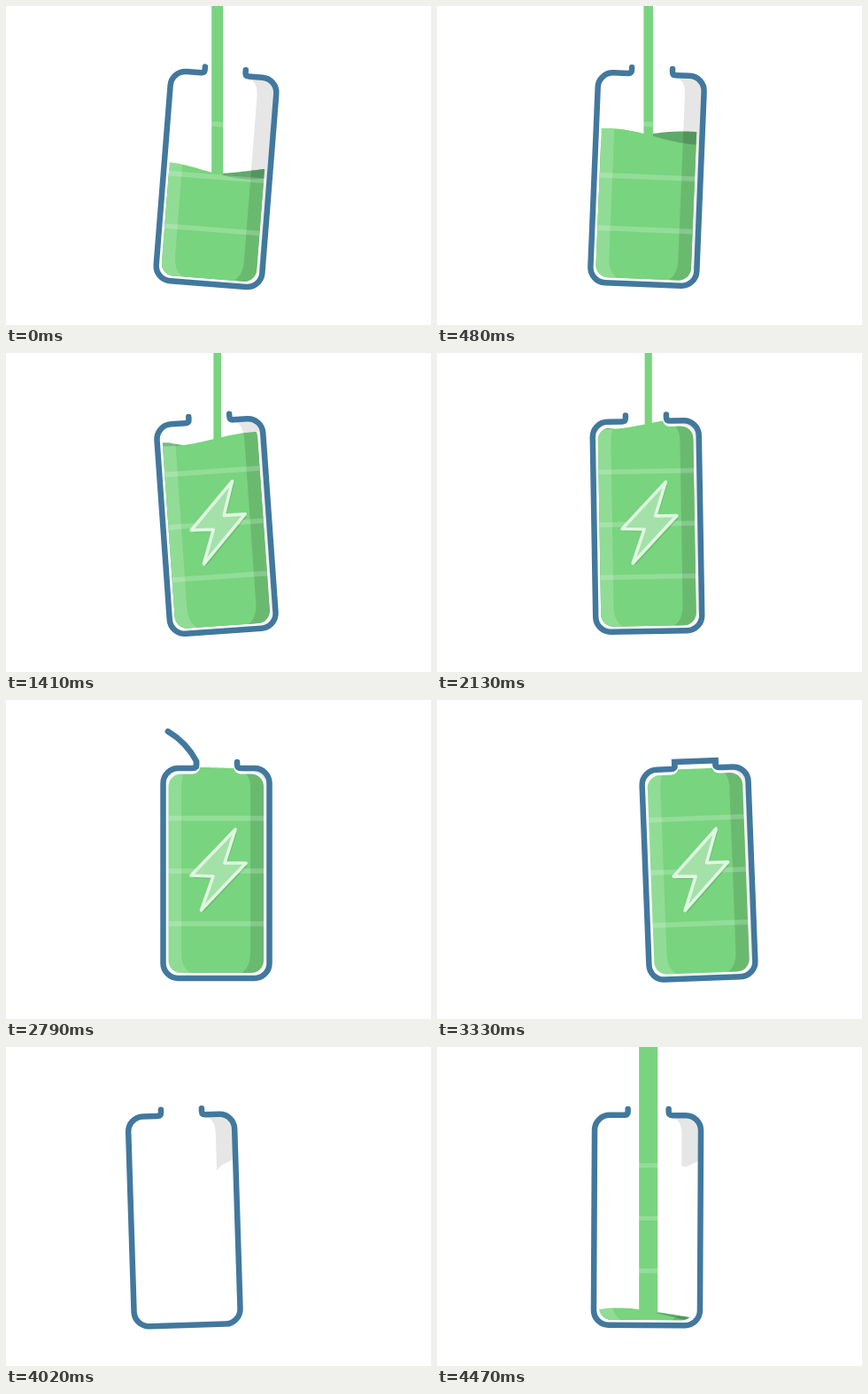
An HTML page that plays this animation: 480 px wide and 360 px high, repeating every 4500 ms.

```html
<!DOCTYPE html>
<html lang="en">
<head>
<meta charset="utf-8">
<title>Filling battery</title>
<style>
  html, body { margin: 0; width: 100%; height: 100%; overflow: hidden; background: #fff; }
  svg { display: block; width: 100vw; height: 100vh; }
</style>
</head>
<body>
<svg id="stage" viewBox="0 0 480 360"></svg>
<script>
const LOOP = 4500, STEP = 30, SEAL = 2790, GAP = 510;
const CX = 237.5, CY = 195.5, HALF = 54, POUR_X = 238.7;
const GREEN = '#78d47e', BLUE = '#42789e', DARK = '#5fa96b', GRAY = '#e6e6e6';

const OUTLINE = 'M215 70V73Q215 77 211 77H194.5A17 17 0 0 0 177.5 94V297A17 17 0 0 0 194.5 314' +
  'H280.5A17 17 0 0 0 297.5 297V94A17 17 0 0 0 280.5 77H265Q261 77 261 73V70';
const INNER = 'M183.5 97A14 14 0 0 1 197.5 83.5H211Q218 83 219 76V72H257V76Q258 83 265 83.5H277' +
  'A14 14 0 0 1 291 97V294A14 14 0 0 1 277 308H197.5A14 14 0 0 1 183.5 294Z';
const LIGHT_SIDE = 'M204 70Q198 88 198 100V285Q198 305 212 310H180V70Z';
const DARK_SIDE = 'M266 80Q276 84 276 100V285Q276 304 263 310H295V80Z';
const BOLT = 'M220.5 237L234 199L209 198L259 146L247 184L271 184Z';

const ramp = (t, a, b) => Math.max(0, Math.min(1, (t - a) / (b - a)));
const smooth = (t, a, b) => { const u = ramp(t, a, b); return u * u * (3 - 2 * u); };
const wave = (t, period) => Math.cos(2 * Math.PI * t / period);

// Smooth monotone curve through [time, value] points.
function track(...pts) {
  const last = pts.length - 1;
  const rise = i => (pts[i + 1][1] - pts[i][1]) / (pts[i + 1][0] - pts[i][0]);
  const tangent = pts.map((_, i) => {
    if (i === 0 || i === last) return 0;
    const a = rise(i - 1), b = rise(i);
    return a * b <= 0 ? 0 : 2 * a * b / (a + b);
  });
  return t => {
    if (t <= pts[0][0]) return pts[0][1];
    if (t >= pts[last][0]) return pts[last][1];
    let i = 0;
    while (t >= pts[i + 1][0]) i++;
    const h = pts[i + 1][0] - pts[i][0], u = (t - pts[i][0]) / h, w = 1 - u;
    return pts[i][1] * (1 + 2 * u) * w * w + pts[i + 1][1] * u * u * (3 - 2 * u) +
      h * u * w * (tangent[i] * w - tangent[i + 1] * u);
  };
}

const slide = track([3060, 0], [3330, 58], [3660, 349.5], [3780, 422], [4320, 507], [4470, GAP]);
const lean = track([2900, 0], [3130, 6], [3330, -2.2], [3570, -13], [3660, -9.7], [4000, -2], [4350, .3]);

function tilt(t) {
  if (t >= SEAL) return lean(t);
  return (4.5 - t / 3500) * wave(t, 3000) * (1 - smooth(t, 2350, SEAL));
}

// Level, slope and hump of the front surface, and slope and hump of the back one.
function liquid(t, fresh) {
  if (fresh) return { level: 318 - 15 * ramp(t, 4370, 4470), slope: 7, hump: -5, backSlope: 3, backHump: -5 };
  const calm = 1 - smooth(t, 2350, 2950), left = 1 - ramp(t, 0, 2450);
  const slope = 10.5 * wave(t - 230, 3000) * calm;
  const hump = (5.5 * wave(t, 1800) - 1.7) * calm;
  return {
    level: 77.5 + 108 * left * left,
    slope, hump,
    backSlope: (3.5 * wave(t, 1800) - 5) * calm,
    backHump: hump + Math.max(0, -slope) * .9
  };
}

function surface(level, slope, hump) {
  let d = '';
  for (let u = -1.5; u <= 1.5; u += .05) {
    const a = Math.max(-1, Math.min(1, u)) * Math.PI / 2;
    d += (d ? 'L' : 'M') + (CX + u * HALF) + ' ' + (level + slope * Math.sin(a) + hump * Math.cos(a));
  }
  return d + `V360H${CX - 1.5 * HALF}Z`;
}

// The neck's left post grows, then swings over and closes the cap.
function lidPath(t) {
  if (t < 2600) return '';
  const angle = Math.PI * .92 * (1 - ramp(t, 2700, 2970) ** 1.5);
  const len = 46.5 * ramp(t, 2600, 2715), bulge = 9 * Math.sin(angle);
  const c = Math.cos(angle), s = Math.sin(angle);
  const x = 215 + len * c, y = 69 - len * s;
  const d = `M215 75V69Q${215 + len * c / 2 + bulge * s} ${69 - len * s / 2 + bulge * c} ${x} ${y}`;
  return t >= 2970 ? d + 'V75' : d;
}

function glassPath(y, drop) {
  return `M266 80Q276 82 276 100V${y + drop}L281 ${y + 1}L296 ${y - 6}V94A17 17 0 0 0 279 78H266Z`;
}

const bands = [133.5, 193, 252.5]
  .map(y => `<rect x="170" y="${y - 2.8}" width="140" height="5.6" fill="#fff" opacity=".2"/>`).join('');

const bottle = id => `<g>
  <clipPath id="in${id}"><path class="turn" d="${INNER}"/></clipPath>
  <clipPath id="front${id}"><path class="front"/></clipPath>
  <clipPath id="both${id}"><path class="front"/><path class="back"/></clipPath>
  <clipPath id="pour${id}"><rect class="pour"/></clipPath>
  <path class="turn glass" fill="${GRAY}"/>
  <g clip-path="url(#front${id})">
    <path class="turn" d="${INNER}" fill="none" stroke="#fff" stroke-width="5" opacity=".85"/>
  </g>
  <g clip-path="url(#in${id})">
    <path class="back" fill="${DARK}"/>
    <path class="front" fill="${GREEN}"/>
    <g clip-path="url(#both${id})"><g class="turn">
      <path d="${LIGHT_SIDE}" fill="#fff" opacity=".18"/>
      <path d="${DARK_SIDE}" opacity=".12"/>
      ${bands}
    </g></g>
  </g>
  <g clip-path="url(#pour${id})">
    <rect width="480" height="360" fill="${GREEN}"/><g class="turn">${bands}</g>
  </g>
  <g class="turn bolt" stroke-linejoin="round" stroke-linecap="round">
    <path class="shade" d="${BOLT}" transform="translate(2 3)"/>
    <path class="fill" d="${BOLT}" fill="#a4e1a8"/>
    <path class="line" d="${BOLT}" fill="none" stroke="#e0f7e2" stroke-width="3.6"/>
  </g>
  <g class="turn" fill="none" stroke="${BLUE}" stroke-width="6.5" stroke-linecap="round">
    <path d="${OUTLINE}" stroke-linejoin="round"/>
    <path class="lid" stroke-miterlimit="2"/>
  </g>
</g>`;

const stage = document.getElementById('stage');
stage.innerHTML = bottle('A') + bottle('B');
const [full, empty] = stage.children;

function set(root, name, attrs) {
  for (const el of root.getElementsByClassName(name))
    for (const k in attrs) el.setAttribute(k, attrs[k]);
}

function drawBolt(root, t) {
  const p = ramp(t, 500, 1070);
  const from = Math.max(0, 120 - 138 * p), to = 120 + 156 * p ** 1.4;
  set(root, 'bolt', { display: p > 0 ? 'inline' : 'none' });
  set(root, 'line', { 'stroke-dasharray': p < 1 ? `0 ${from} ${to - from} 999` : 'none' });
  set(root, 'fill', { opacity: smooth(t, 900, 1250) });
  set(root, 'shade', { opacity: .1 * smooth(t, 600, 1000) });
}

function drawBottle(root, t, fresh) {
  const shown = fresh ? t > 3300 : t < 3800;
  root.setAttribute('display', shown ? 'inline' : 'none');
  if (!shown) return;

  const x = slide(t) - (fresh ? GAP : 0);
  const turn = `translate(${x} 0) rotate(${tilt(t)} ${CX} ${CY})`;
  set(root, 'turn', { transform: turn });

  const sealed = !fresh && t >= SEAL;
  const q = liquid(t, fresh), transform = sealed ? turn : `translate(${x} 0)`;
  set(root, 'front', { d: surface(q.level, q.slope, q.hump), transform });
  set(root, 'back', { d: sealed ? '' : surface(q.level, q.backSlope, q.backHump), transform });

  const top = fresh ? 0 : 95 * ramp(t, 2390, 2570);
  const fall = fresh ? 308 * (t - 4230) / 150 : 360;
  const end = sealed ? 0 : Math.min(q.level + q.hump + 2, 305, fall);
  const width = fresh ? 14 + 7 * ramp(t, 4230, 4470) : 8 + 5 * Math.exp(-t / 700);
  set(root, 'pour', { x: POUR_X - width / 2, y: top, width, height: Math.max(0, end - top) });

  drawBolt(root, fresh ? 0 : t);
  set(root, 'glass', { d: fresh ? glassPath(134, 13 * (1 - ramp(t, 3660, 4400))) : glassPath(300, 0) });
  set(root, 'lid', { d: fresh ? '' : lidPath(t) });
}

function tick() {
  const t = Math.floor(performance.now() % LOOP / STEP) * STEP;
  drawBottle(full, t, false);
  drawBottle(empty, t, true);
  requestAnimationFrame(tick);
}
tick();
</script>
</body>
</html>
```
